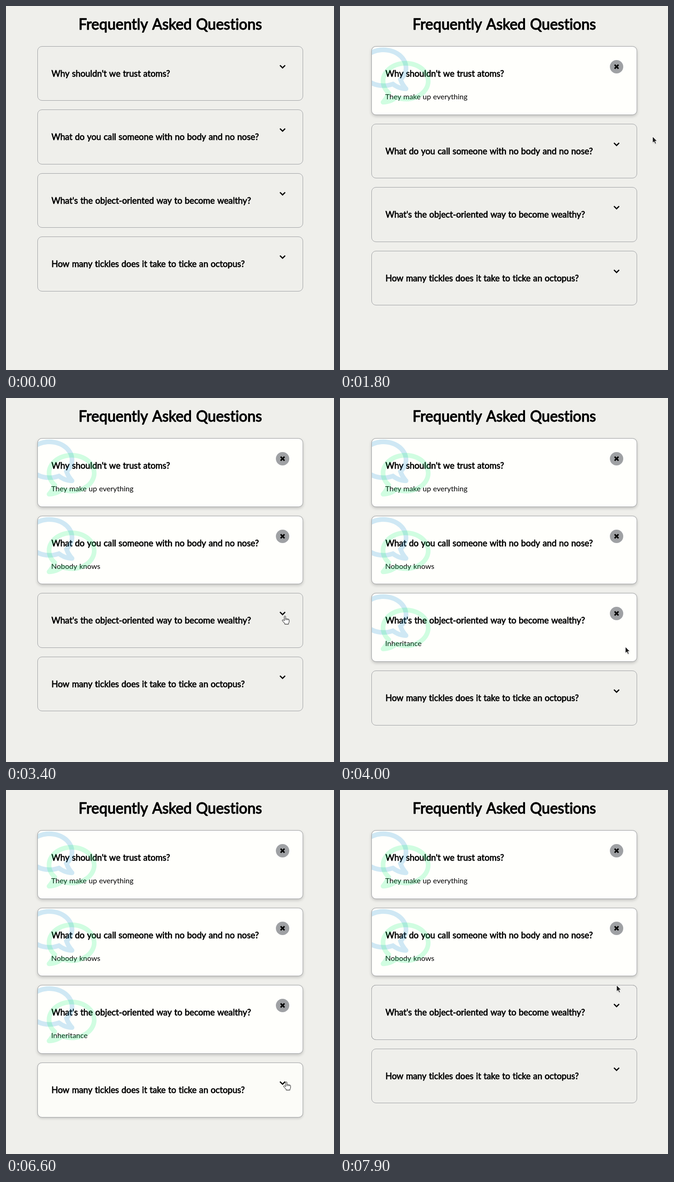
An HTML page with a canvas for the animation above (8000 ms loop, 711x788 px).

```html
<!DOCTYPE html>
<html lang="en">
<head>
<meta charset="utf-8">
<title>Frequently Asked Questions</title>
<style>
  html, body { margin: 0; width: 100%; height: 100%; overflow: hidden; background: #efefeb; }
  canvas { display: block; }
</style>
</head>
<body>
<canvas id="stage" width="711" height="788"></canvas>
<script>
const ctx = document.getElementById('stage').getContext('2d');
const LOOP = 8000, STEP = 100, FADE = 300;
const LEFT = 68, WIDTH = 576, TOP = 87.44, CLOSED = 117.47, ANSWER = 30.23, GAP = 20;

const cards = [
  { question: "Why shouldn't we trust atoms?", answer: 'They make up everything', open: 1280 },
  { question: 'What do you call someone with no body and no nose?', answer: 'Nobody knows', open: 2580 },
  { question: "What's the object-oriented way to become wealthy?", answer: 'Inheritance', open: 3680, close: 7705 },
  { question: 'How many tickles does it take to ticke an octopus?', answer: 'Ten-ticles!', open: 4810, close: 6555 }
];

// time, shape, x, y
const pointer = [
  [600, 'arrow', 669, 160], [700, 'arrow', 617, 133],
  [900, 'hand', 601, 130], [1000, 'hand', 597, 127], [1100, 'hand', 594, 128],
  [1700, 'arrow', 699, 225], [1800, 'arrow', 677, 282], [1900, 'arrow', 634, 318],
  [2100, 'arrow', 612, 309], [2200, 'hand', 590, 298], [2300, 'hand', 582, 292],
  [2500, 'hand', 588, 296], [2900, 'arrow', 620, 376], [3000, 'arrow', 615, 435],
  [3200, 'hand', 604, 469], [3400, 'hand', 598, 471],
  [4000, 'arrow', 618, 538], [4100, 'arrow', 616, 566], [4200, 'arrow', 612, 585],
  [4400, 'arrow', 609, 606], [4500, 'hand', 602, 625], [4600, 'hand', 601, 631],
  [7000, 'arrow', 618, 574], [7100, 'arrow', 616, 519],
  [7300, 'arrow', 613, 501], [7400, 'hand', 602, 476], [7500, 'hand', 598, 467], [7600, 'hand', 596, 462],
  [7900, 'arrow', 599, 422]
];

const bubble = new Path2D('M256 32C114.6 32 0 125.1 0 240c0 47.6 19.9 91.2 52.9 126.3C38 405.7 7 439.1 6.5 439.5' +
  'c-6.6 7-8.4 17.2-4.6 26S14.4 480 24 480c61.5 0 110-25.7 139.1-46.3C192 442.8 223.2 448 256 448' +
  'c141.4 0 256-93.1 256-208S397.4 32 256 32zm0 368c-26.7 0-53.1-4.1-78.4-12.1l-22.7-7.2-19.5 13.8' +
  'c-14.3 10.1-33.9 21.4-57.5 29 7.3-12.1 14.4-25.7 19.9-40.2l10.6-28.1-20.6-21.8' +
  'C69.7 314.1 48 282.2 48 240c0-88.2 93.3-160 208-160s208 71.8 208 160-93.3 160-208 160z');
const shapes = {
  arrow: { fill: '#1c1c1c', line: '#fff', path: new Path2D('M.5.5V14.5L3.8 11.5 6 16.6 8.4 15.6 6.2 10.6H10.4Z') },
  hand: { fill: '#fff', line: '#222', path: new Path2D('M5.3 11V2.2a1.4 1.4 0 0 1 2.8 0V7q1.4-1.2 2.6.2 1.5-.8 2.5.5 ' +
    '2.2-.6 2.6 1.4V13q0 2-1.3 3.3V18.5H6.2V16.6L1 11.2q-.8-1.6 1-2 1.2 0 3.3 2ZM8.1 7v3M10.7 7.3v2.7M13.2 7.8v2.4') }
};

// CSS "ease" timing curve
function ease(x) {
  if (x <= 0) return 0;
  if (x >= 1) return 1;
  const curve = (u, a, b) => 3 * u * (1 - u) ** 2 * a + 3 * u * u * (1 - u) * b + u ** 3;
  let low = 0, high = 1;
  for (let i = 0; i < 20; i++) {
    const mid = (low + high) / 2;
    if (curve(mid, .25, .25) < x) low = mid; else high = mid;
  }
  return curve(low, .1, 1);
}

function text(string, x, y, size, bold) {
  ctx.font = `400 ${size}px Lato, sans-serif`;
  ctx.letterSpacing = '0.01px'; // any spacing turns ligatures off
  ctx.wordSpacing = `${size * .03}px`;
  ctx.fillStyle = ctx.strokeStyle = '#000';
  const weight = bold ? size / 24 : 0;
  ctx.fillText(string, x + weight / 2, y);
  if (bold) {
    ctx.lineWidth = weight;
    ctx.lineJoin = 'round';
    ctx.strokeText(string, x + weight / 2, y);
  }
}

function line(points, width) {
  ctx.beginPath();
  points.forEach(([x, y]) => ctx.lineTo(x, y));
  ctx.lineWidth = width;
  ctx.lineJoin = 'miter';
  ctx.strokeStyle = '#000';
  ctx.stroke();
}

function box(inset, top, height) {
  const path = new Path2D();
  path.roundRect(LEFT + inset, top + inset, WIDTH - 2 * inset, height - 2 * inset, 10 - inset);
  return path;
}

function shadow(outer, amount) {
  ctx.save();
  const outside = new Path2D(outer);
  outside.rect(0, 0, 711, 788);
  ctx.clip(outside, 'evenodd');
  ctx.shadowColor = `rgba(0,0,0,${.19 * amount})`;
  ctx.shadowOffsetY = 3 * amount;
  ctx.shadowBlur = 6 * amount;
  ctx.fillStyle = '#000';
  ctx.fill(outer);
  ctx.restore();
}

function drawBubble(x, y, flip, color) {
  const scale = 108 / 512;
  ctx.save();
  ctx.translate(x, y);
  ctx.scale(flip * scale, scale);
  ctx.fillStyle = color;
  ctx.fill(bubble);
  ctx.restore();
}

function drawToggle(y, open) {
  const x = 599.5;
  if (!open) return line([[x - 5.6, y - 3], [x, y + 2.5], [x + 5.6, y - 3]], 2.6);
  ctx.fillStyle = '#9fa1a4';
  ctx.beginPath();
  ctx.arc(x, y, 14.5, 0, 7);
  ctx.fill();
  line([[x - 4.2, y - 4.2], [x + 4.2, y + 4.2]], 3.2);
  line([[x - 4.2, y + 4.2], [x + 4.2, y - 4.2]], 3.2);
}

function drawCard(card, y, open, amount) {
  const top = Math.floor(y);
  const height = Math.ceil(y + CLOSED + (open ? ANSWER : 0)) - top;
  const outer = box(0, top, height);
  if (amount > 0) {
    shadow(outer, amount);
    ctx.fillStyle = `rgba(255,255,252,${amount})`;
    ctx.fill(outer);
  }
  text(card.question, 98, top + 66, 18.72, true);
  if (open) {
    text(card.answer, 98, top + 115, 16, false);
    ctx.save();
    ctx.clip(box(1, top, height));
    drawBubble(LEFT + 80.2, top - 3.9, -1, 'rgba(15,140,210,.2)');
    drawBubble(LEFT + 20.3, top + 25, 1, 'rgba(20,245,115,.2)');
    ctx.restore();
  }
  ctx.strokeStyle = '#9fa1a4';
  ctx.lineWidth = 1;
  ctx.stroke(box(.5, top, height));
  drawToggle(top + 44.4, open);
}

function drawPointer(time) {
  const now = pointer.filter(key => key[0] <= time).pop();
  if (!now) return;
  const [, kind, x, y] = now, shape = shapes[kind];
  ctx.save();
  ctx.translate(x, y);
  ctx.lineWidth = 1;
  ctx.lineJoin = 'round';
  ctx.fillStyle = shape.fill;
  ctx.strokeStyle = shape.line;
  ctx.shadowColor = 'rgba(0,0,0,.25)';
  ctx.shadowBlur = 2;
  ctx.shadowOffsetY = 1;
  ctx.fill(shape.path);
  ctx.shadowColor = 'transparent';
  ctx.stroke(shape.path);
  ctx.restore();
}

function draw(time) {
  ctx.fillStyle = '#efefeb';
  ctx.fillRect(0, 0, 711, 788);
  ctx.textAlign = 'center';
  text('Frequently Asked Questions', 355.5, 51, 32, true);
  ctx.textAlign = 'left';
  let y = TOP;
  for (const card of cards) {
    const { open: opens, close: closes = Infinity } = card;
    const open = time >= opens && time < closes;
    const amount = ease((time - opens) / FADE) - ease((time - closes) / FADE);
    drawCard(card, y, open, amount);
    y += CLOSED + GAP + (open ? ANSWER : 0);
  }
  drawPointer(time);
}

const start = performance.now();
function tick() {
  const time = (performance.now() - start) % LOOP;
  draw(Math.floor(time / STEP) * STEP);
  requestAnimationFrame(tick);
}
tick();
</script>
</body>
</html>
```
